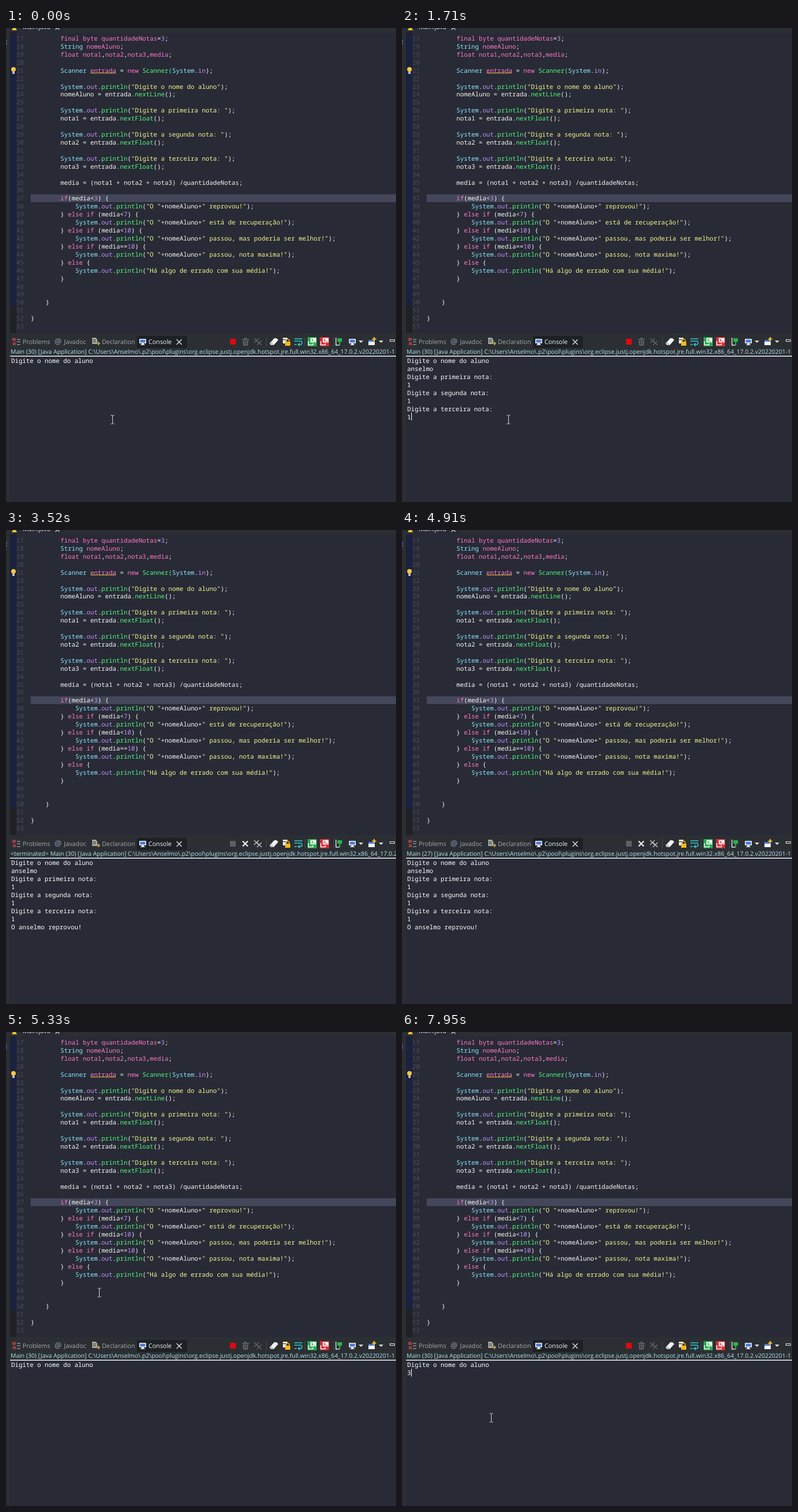
These frames come from a looping animation (679 px wide and 825 px high, 8 s). An HTML page:

```html
<!DOCTYPE html>
<html lang="pt">
<head>
<meta charset="utf-8">
<title>Console</title>
<style>
html, body { margin: 0; width: 100%; height: 100%; overflow: hidden; background: #282a36; }
svg { display: block; width: 679px; height: 825px; color: #25a84c; }
text { white-space: pre; text-rendering: geometricPrecision; }
.mono { font: 500 10.8px "Noto Sans Mono", "DejaVu Sans Mono", monospace; fill: #f8f8f2; }
.ui { font: 10.8px "Open Sans", "Noto Sans", sans-serif; fill: #a4a8ab; }
#out .mono { fill: #fff; }
#title { font-size: 10.45px; fill: #b4e3f0; }
.num { font-weight: 400; fill: #4a4d5b; }
.key, .decl { fill: #ff79c6; }
.type { fill: #8be9fd; }
.call { fill: #50fa7b; }
.field, .digit { fill: #bd93f9; }
.str { fill: #f1fa8c; }
.line { fill: none; stroke-width: 1.5; }
</style>
</head>
<body>
<svg viewBox="0 0 679 825">
  <rect width="679" height="825" fill="#2b2f33"/>
  <rect x="7" y="8" width="672" height="523" fill="#282a36"/>
  <rect x="7" y="8" width="11" height="523" fill="#1f2124"/>
  <rect x="8" y="10" width="10" height="474" fill="#1b2140"/>
  <rect x="43" y="289.500" width="636" height="13.500" fill="#44475a"/>
  <path d="M2 22H0v6h2" class="line" stroke="#3c6fd0"/>

  <!-- editor tab -->
  <rect x="8" width="92" height="8" fill="#282a36"/>
  <text class="ui" x="29" y="2" style="fill:#e6e8ea">Main.java</text>
  <path d="M14.500-5L19 4H10z" fill="#f2c230"/>
  <path d="M86-4l7 7m0-7l-7 7" class="line" stroke="#c8cacc"/>

  <g id="code"></g>
  <path id="wave" class="line" stroke="#f4c82d" style="stroke-width:1"/>
  <circle cx="13" cy="72" r="4" fill="#f5c842"/>
  <rect x="11" y="76" width="4" height="4" fill="#b9bcc2"/>

  <!-- view tabs -->
  <rect x="228" y="536" width="87" height="21" fill="#1d2125"/>
  <g class="ui">
    <text x="29" y="550">Problems</text>
    <text x="101" y="550">Javadoc</text>
    <text x="167" y="550">Declaration</text>
    <text x="248" y="550" style="fill:#f4f6f8">Console</text>
    <text x="84.500" y="550" style="font-size:13.500px;fill:#9ba8c4">@</text>
  </g>
  <path d="M19 542h6m-6 4h6m-6 5h6" class="line" stroke="#8a9096"/>
  <path d="M12 540.500h4v3h-4zM12 547l5 5m0-5l-5 5" class="line" stroke="#d04848"/>
  <path d="M150 539h6l3 3v8h-9z" fill="#a7a99d"/>
  <path d="M151.500 543h5m-5 3h5" class="line" stroke="#4c5054"/>
  <path d="M156 549h6m-2-3l3 3-3 3" class="line" stroke="#c8a850"/>
  <g id="screen"><rect x="232" y="541" width="12" height="8" rx="1" fill="#e9eef8"/>
    <rect x="233.500" y="542.500" width="9" height="5" fill="#4f78d8"/>
    <path d="M236 549h4v2h2v1h-8v-1h2z" fill="#e9eef8"/></g>
  <path d="M297 542l9 9m0-9l-9 9" class="line" stroke="#d4d7da"/>

  <!-- toolbar -->
  <rect id="stop" x="390" y="541" width="10" height="10"/>
  <g id="trash" fill="#5c6064"><path d="M411 541h12v2h-12zM415 539h4v2h-4zM412 544h10l-1 9h-8z"/>
    <path d="M415.500 545v6m3-6v6" stroke="#2b2f33"/></g>
  <path id="cross" d="M412 541.500l9 9m0-9l-9 9" class="line" stroke="#f0f2f4" style="stroke-width:2.200"/>
  <path id="crosses" d="M432 540l8 8m0-8l-8 8m5-4l8 8m0-8l-8 8" class="line"/>
  <path d="M453.500 538v16" stroke="#45494d"/>
  <path d="M459 549l8-9h4l3 3-8 9h-5z" fill="#f4f4f4"/>
  <path d="M459 549l2-3 5 5-1 1h-4z" fill="#b9c4cc"/>
  <path d="M482 539h8v3h-8zm0 4h5v6h-5z" fill="#e6e6df"/>
  <rect x="486" y="546" width="9" height="7" fill="#f5b91c"/>
  <path d="M488 546v-3q2.500-3 5 0v3" class="line" stroke="#f5b91c"/>
  <path d="M502 541h14m-14 4h12q3 3 0 6h-5m2.500-2.500l-3 2.500 3 2.500M502 551h4" class="line" stroke="#31c9cf"/>
  <path d="M520.500 538v16m50-16v16" stroke="#45494d"/>
  <g id="std"><rect x="525" y="538" width="16" height="16" fill="currentColor"/>
    <rect x="530" y="539.500" width="10" height="8" fill="#f0f3f2"/>
    <path d="M532 541.500l2.500 2-2.500 2m3.500 .5h3" class="line" stroke="currentColor" style="stroke-width:1.200"/>
    <path d="M526.500 545v6.500h8v-2.500" class="line" stroke="#f0f3f2"/></g>
  <use href="#std" x="21.500" color="#d72b36"/>
  <path d="M574.500 539v13h6" class="line" stroke="#e1e4e6"/>
  <path d="M577 540h8v6h-3v6h-2v-6h-3z" fill="#2ab34b"/>
  <use href="#screen" x="365"/>
  <path id="drop" d="M614 544h8l-4 4z" fill="#d9dcde"/>
  <use href="#drop" x="35"/>
  <rect x="631" y="543" width="11" height="9" fill="#f1f4fa"/>
  <rect x="631" y="543" width="11" height="3" fill="#4f78d8"/>
  <path d="M641 538v7m-3.500-3.500h7" class="line" stroke="#f7c531" style="stroke-width:2.200"/>
  <rect x="668.500" y="542.500" width="8" height="3" class="line" stroke="#e2e5e7" style="stroke-width:1"/>

  <!-- console -->
  <text id="title" class="ui" x="8" y="567"></text>
  <rect x="7" y="572" width="672" height="253" fill="#282a36"/>
  <rect x="7" y="570.500" width="672" height="1.500" fill="#f4f5f6"/>
  <rect id="focus" x="7" y="823.500" width="672" height="1.500" fill="#316a9e"/>
  <g id="out"></g>
  <rect id="caret" width="1" height="13.500" fill="#fff"/>

  <path id="beam" class="line" stroke="#d8d8dc" style="stroke-width:1"
    d="M-2.500-7h2l1 1 1-1h2M.5-6v13M-2.500 8h2l1-1 1 1h2"/>
  <path id="sash" fill="#fff" stroke="#222" stroke-width=".5"
    d="M0-9.500l4 5H.8v9H4l-4 5-4-5h3.200v-9H-4z"/>
</svg>
<script>
const $ = id => document.getElementById(id);
const CHAR = 6.48, ROW = 13.92, LOOP = 8000;
const ns = "http://www.w3.org/2000/svg";

const source = `        final byte quantidadeNotas=3;
        String nomeAluno;
        float nota1,nota2,nota3,media;

        Scanner entrada = new Scanner(System.in);

        System.out.println("Digite o nome do aluno");
        nomeAluno = entrada.nextLine();

        System.out.println("Digite a primeira nota: ");
        nota1 = entrada.nextFloat();

        System.out.println("Digite a segunda nota: ");
        nota2 = entrada.nextFloat();

        System.out.println("Digite a terceira nota: ");
        nota3 = entrada.nextFloat();

        media = (nota1 + nota2 + nota3) /quantidadeNotas;

        if(media<3) {
            System.out.println("O "+nomeAluno+" reprovou!");
        } else if (media<7) {
            System.out.println("O "+nomeAluno+" está de recuperação!");
        } else if (media<10) {
            System.out.println("O "+nomeAluno+" passou, mas poderia ser melhor!");
        } else if (media==10) {
            System.out.println("O "+nomeAluno+" passou, nota maxima!");
        } else {
            System.out.println("Há algo de errado com sua média!");
        }


    }

}
`.split("\n");

const tokens = /"[^"]*"|Scanner\(|\w+|[^\w"]+/g;
const rules = [
  ["str", /^"/],
  ["key", /^(final|byte|float|new|if|else)$/],
  ["type", /^(System|String|Scanner)$/],
  ["call", /^(println|nextLine|nextFloat|Scanner\()$/],
  ["field", /^(out|in)$/],
  ["digit", /^\d+$/]
];

function addText(parent, x, y, cls) {
  const el = document.createElementNS(ns, "text");
  el.setAttribute("x", x);
  el.setAttribute("y", y);
  el.setAttribute("class", cls);
  return parent.appendChild(el);
}

source.forEach((line, i) => {
  const y = 22 + ROW * i;
  addText($("code"), 18, y, "mono num").textContent = 17 + i;
  const indent = line.search(/\S/);
  if (indent < 0) return;
  const el = addText($("code"), 43 + indent * CHAR, y, "mono");
  const declares = /^ +(final|String|float|Scanner) /.test(line);
  for (const part of line.trim().match(tokens)) {
    const span = document.createElementNS(ns, "tspan");
    const rule = rules.find(r => r[1].test(part));
    const name = rule ? rule[0] : declares && /^\w/.test(part) ? "decl" : "";
    if (name) span.setAttribute("class", name);
    span.textContent = part;
    el.append(span);
  }
});

let wave = "M147 79";
for (let x = 149; x <= 192; x += 2) wave += `L${x} ${x % 4 === 1 ? 77.5 : 79.5}`;
$("wave").setAttribute("d", wave);

// "|" marks the caret
const name = "anselmo";
const ask = "Digite o nome do aluno\n";
const first = ask + name + "\nDigite a primeira nota:\n";
const second = first + "1\nDigite a segunda nota:\n";
const third = second + "1\nDigite a terceira nota:\n";
const done = third + "1\n", verdict = `O ${name} reprovou!`;
const menu = `Exiba em tela uma lista de opções para o usuário escolher e para cada escolha retornar uma mensagem diferente
Qual é a sua cor favorita?
Digite o nome da cor escolhida:
Verde
Azul
Amarelo
Vermelho
|`;
const typed = n => ask + name.slice(0, n) + "|";

const screens = [
  [0, ask], [140, typed(1)], [270, typed(3)], [420, typed(5)], [540, typed(6)],
  [690, typed(7)], [810, ask + name + "\n|"],
  [930, ask + name + "\n|Digite a primeira nota:"],
  [1080, first + "1|"], [1200, second], [1320, second + "|"], [1440, second + "1|"],
  [1590, third + "|"], [1710, third + "1|"],
  [1860, done + "|" + verdict], [2550, done + verdict],
  [2980, done + "|" + verdict], [3520, done + verdict],
  [4080, done + "|" + verdict], [4610, done + verdict],
  [5060, menu], [5210, ask],
  [5750, ask + "|"], [6350, ask], [6890, ask + "|"], [7350, ask], [7950, ask + "3|"]
];

const app = " [Java Application] C:\\Users\\Anselmo\\.p2\\pool\\plugins\\org.eclipse.justj.openjdk.hotspot.jre.full.win32.x86_64_17.0.2.v20220201-1";
const titles = [
  [0, "Main (30)"], [1980, "<terminated> Main (30)"], [4910, "Main (27)"], [5210, "Main (30)"]
];
const running = [[0, true], [1980, false], [5060, true]];

const pointers = [
  [0, "beam", 185, 681], [140], [540, "beam", 185, 681], [690], [930, "beam", 185, 681],
  [2550, "sash", 85, 533], [2680, "beam", 91, 365], [2830, "beam", 72, 189],
  [2980, "beam", 103, 71], [3130, "beam", 181, 12], [3250],
  [5210, "beam", 165, 68], [5330, "beam", 162, 453], [5450, "beam", 223, 545],
  [5600, "beam", 153, 638], [5750, "beam", 155, 671]
];

const at = (steps, t) => steps.findLast(s => s[0] <= t);
const show = (id, on) => { $(id).style.display = on ? "" : "none"; };

const rows = Array.from({ length: 9 }, (_, i) => addText($("out"), 9, 583.4 + ROW * i, "mono"));

function drawConsole(text) {
  const lines = text.replace("|", "").split("\n");
  rows.forEach((row, i) => { row.textContent = lines[i] || ""; });
  const pos = text.indexOf("|");
  show("caret", pos >= 0);
  if (pos >= 0) {
    const before = text.slice(0, pos).split("\n");
    $("caret").setAttribute("x", Math.ceil(9 + before.at(-1).length * CHAR));
    $("caret").setAttribute("y", 572.4 + 13.87 * (before.length - 1));
  }
  show("focus", text === menu);
}

function drawTools(on) {
  $("stop").setAttribute("fill", on ? "#e3060f" : "#5c6064");
  $("crosses").setAttribute("stroke", on ? "#5c6064" : "#b8bcc0");
  show("trash", on);
  show("cross", !on);
}

function drawPointer([, kind, x, y]) {
  for (const id of ["beam", "sash"]) show(id, id === kind);
  if (kind) $(kind).setAttribute("transform", `translate(${x} ${y})`);
}

let start;
function frame(now) {
  start ??= now;
  const t = (now - start) % LOOP;
  drawConsole(at(screens, t)[1]);
  $("title").textContent = at(titles, t)[1] + app;
  drawTools(at(running, t)[1]);
  drawPointer(at(pointers, t));
  requestAnimationFrame(frame);
}
requestAnimationFrame(frame);
</script>
</body>
</html>
```
